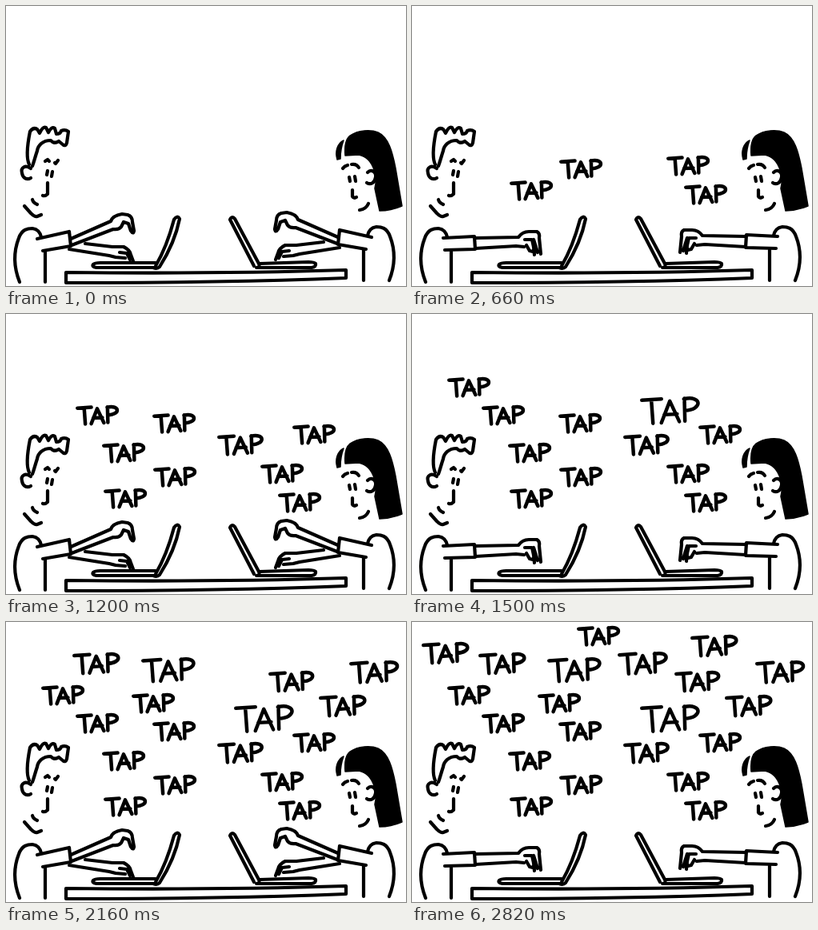
An HTML page for the animation above (2.88 s loop, 500 by 350 pixels).

```html
<!DOCTYPE html>
<html lang="en">
<head>
<meta charset="utf-8">
<title>Tap tap tap</title>
<style>
  html, body { margin: 0; width: 100%; height: 100%; overflow: hidden; background: #fff; }
  svg { display: block; width: 100vw; height: 100vh; }
  .ink { fill: none; stroke: #000; stroke-width: 4.2; stroke-linecap: round; stroke-linejoin: round; }
  .solid { fill: #000; stroke-width: 1.5; }
  .paper { fill: #fff; }
  .word { stroke-width: 4.5; vector-effect: non-scaling-stroke; }
</style>
</head>
<body>
<svg viewBox="0 0 500 350" xmlns="http://www.w3.org/2000/svg">
  <defs>
    <g id="typist">
      <path d="M17 345C9 325 9 308 16 290C20 279 27 278 33 278C40 279 43 284 44 289M49 307L49 345"/>
      <g class="up">
        <path d="M39 291L79 282L81 300L46 306"/>
        <path d="M81 291L131 269C133 263 139 261 145 260L152 261Q158 263 158 270L160 281Q159 286 156 281L153 272L147 270L144 276Q141 280 134 279L82 299"/>
        <path d="M99 297L133 301L147 301Q155 305 156 311L159 319M79 304L129 312L137 314L149 315M142 308L151 309L155 317"/>
      </g>
      <g class="down">
        <path d="M39 290L78 288L79 304L41 305"/>
        <path d="M79 290L133 289Q138 282 146 282L156 282Q160 284 159 290L161 310M79 303L130 300L140 301M141 292L150 292L152 301L153 311M152 292L157 308M143 299L147 306L151 307"/>
      </g>
    </g>
  </defs>

  <g class="ink">
    <path d="M75 333Q270 335 425 330L425 340Q270 346 75 346Z"/>
    <path d="M187 325Q201 301 210 267Q214 261 217 266Q211 296 192 326Q189 329 184 327L113 327Q107 326 109 323Q111 321 118 321L187 321"/>
    <path d="M310 325L280 267Q282 262 286 266L316 322Q318 327 313 327L382 327Q388 326 387 322Q385 320 378 320L317 322"/>
    <use href="#typist"/>
    <use href="#typist" transform="translate(496 -2) scale(-1 1)"/>
  </g>

  <g class="ink">
    <path d="M29 198C25 190 27 172 30 157Q34 151 39 154L42 159Q46 150 50 152L53 158Q57 150 61 153L63 160Q68 160 69 156Q74 154 78 157L76 171Q75 175 72 174L66 169Q60 173 56 168C46 168 40 174 39 181C36 190 35 195 33 200"/>
    <path d="M31 203C24 198 18 202 20 209C21 215 26 218 31 215"/>
    <path d="M49 194L52 192L54 194M61 196L62 197L65 193M52 206L51 211M58 207L57 213M52 221L52 235Q49 238 46 237"/>
    <path d="M23 250L31 259Q36 264 39 263L44 261M33 242Q34 246 39 248"/>
  </g>

  <g class="ink">
    <path class="solid" d="M424 187C423 176 425 166 430 162C440 155 456 154 465 158C478 164 483 182 487 203L495 250Q481 256 467 256L461 228Q464 215 460 205C457 195 450 188 441 186Z"/>
    <path class="solid" d="M414 192C411 182 414 172 422 168C419 176 418 184 418 191Z"/>
    <path class="paper" d="M452 208C457 203 463 208 462 214C461 221 456 224 451 221"/>
    <path d="M421 203Q423 200 427 199M432 198Q438 197 441 202M429 214L430 219M436 213L437 219M433 230L433 238Q435 241 438 239M442 255Q450 254 453 247"/>
  </g>

  <g id="words" class="ink"></g>
</svg>
<script>
const STEP = 60, COUNT = 48;
const WIDTH = 54, HEIGHT = 27, PEN = 4.5;
const LETTERS = "M0 11L35 6M17 10L20 99M35 97L50 14L67 92M40 66L63 63M76 4L77 90M75 6C108 -9 109 47 77 50";

// Two streams of words rise from the laptops: left, top and, for bigger ones, size.
const leftStream = [
  [122, 217], [184, 190], [120, 160], [183, 123], [87, 113], [44, 78],
  [157, 88], [169, 43, 1.25], [83, 37, 1.1], [12, 24, 1.1], [206, 4]
];
const rightStream = [
  [340, 222], [318, 186], [264, 149, 1.07], [358, 137], [285, 102, 1.38],
  [391, 90, 1.1], [429, 47, 1.15], [328, 60, 1.06], [348, 15, 1.1], [257, 36, 1.16]
];

function makeWord([x, y, size = 1]) {
  const path = document.createElementNS("http://www.w3.org/2000/svg", "path");
  const scale = length => (length * size - PEN) / 100;
  path.setAttribute("d", LETTERS);
  path.setAttribute("class", "word");
  path.setAttribute("role", "img");
  path.setAttribute("aria-label", "TAP");
  path.setAttribute("transform",
    `translate(${x + PEN / 2} ${y + PEN / 2}) scale(${scale(WIDTH)} ${scale(HEIGHT)})`);
  document.getElementById("words").append(path);
  return path;
}

const leftWords = leftStream.map(makeWord);
const rightWords = rightStream.map(makeWord);
const up = document.querySelector(".up");
const down = document.querySelector(".down");
const show = (node, visible) => node.setAttribute("visibility", visible ? "visible" : "hidden");

function draw(ms) {
  const tick = Math.floor(ms / STEP) % COUNT;
  show(up, tick % 2 === 0);
  show(down, tick % 2 === 1);
  // The streams take turns, one word every two ticks.
  leftWords.forEach((word, i) => show(word, tick >= 4 + 4 * i));
  rightWords.forEach((word, i) => show(word, tick >= 6 + 4 * i));
}

const start = performance.now();
function loop() {
  draw(performance.now() - start);
  requestAnimationFrame(loop);
}
loop();
</script>
</body>
</html>
```
